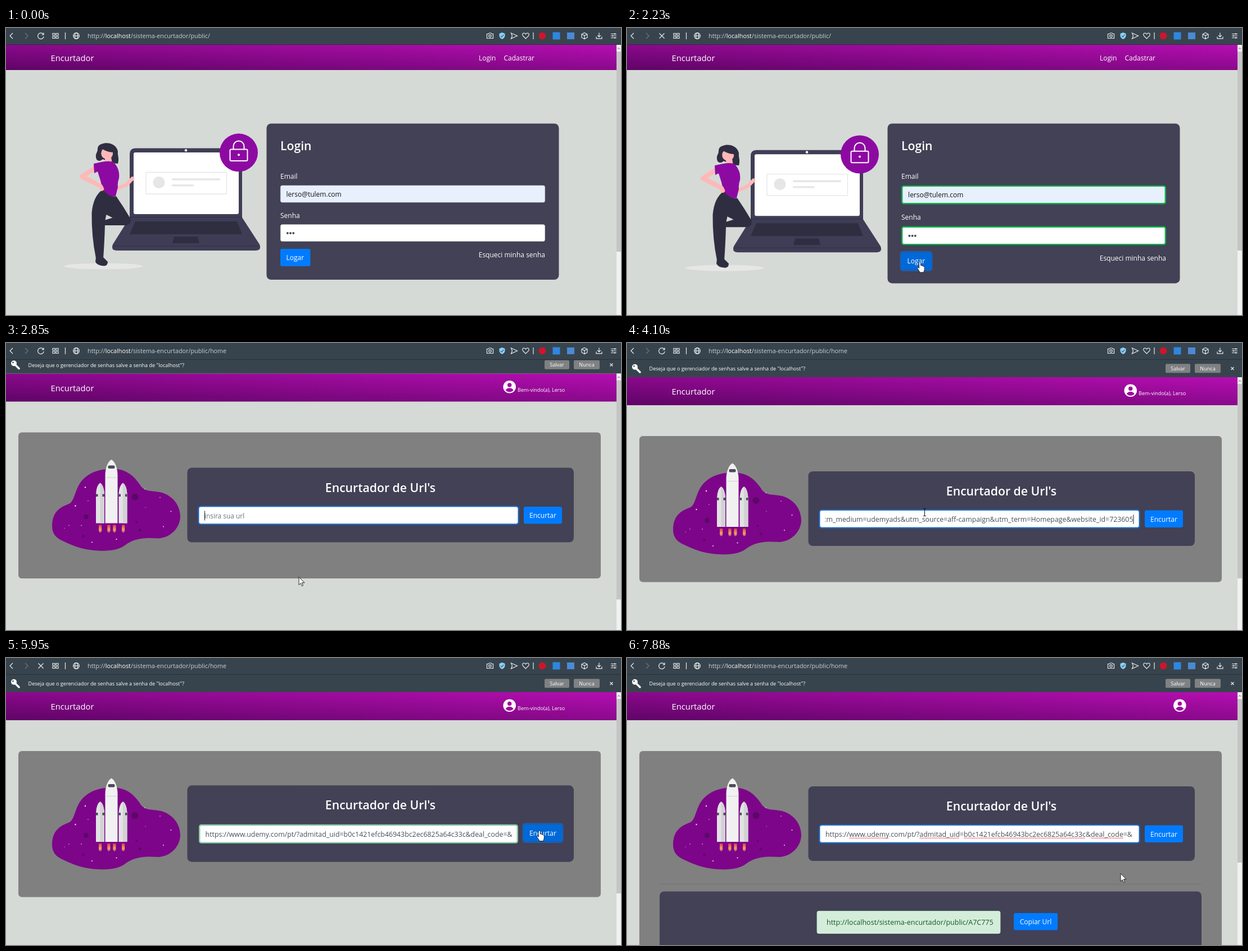
These frames come from a looping animation (1094x512 px, 8 s). An HTML page:

```html
<!DOCTYPE html>
<html lang="pt">
<head>
<meta charset="utf-8">
<title>Encurtador</title>
<style>
html, body { margin: 0; width: 100%; height: 100%; overflow: hidden; background: #d5dad6; }
svg { display: block; width: 1094px; height: 512px; font: 500 12px 'Open Sans', 'Noto Sans', sans-serif; }
text { fill: #fff; white-space: pre; }
.brand { font-size: 14.8px; }
.title { font-size: 21.2px; font-weight: 600; }
.address { font-size: 10.8px; font-weight: 400; fill: #c9cfd4; }
.small { font-size: 9.1px; }
.field { font-size: 12.35px; font-weight: 400; fill: #495057; }
.line { fill: none; stroke: #e8ebed; stroke-width: 1.2; }
.card { fill: #424155; }
.navy { fill: #3f3d56; }
.dark { fill: #2f2e41; }
.skin { fill: #ffb8b8; }
.limb { fill: none; stroke: #ffb8b8; stroke-linecap: round; stroke-linejoin: round; }
.purple { fill: #8d0aa2; }
.pale { fill: #e6e6e6; }
.blue { fill: #007bff; }
.ring { fill: none; stroke: #007bff; }
</style>
</head>
<body>
<svg viewBox="0 0 1094 512">
  <defs>
    <linearGradient id="navFill" x1="0" y1="1" x2="1" y2="0">
      <stop stop-color="#5f0466"/><stop offset="1" stop-color="#b50eb1"/>
    </linearGradient>
    <linearGradient id="flameFill" x1="0" y1="0" x2="0" y2="1">
      <stop stop-color="#d8434e"/><stop offset=".6" stop-color="#f5a05a"/><stop offset="1" stop-color="#f5c08a" stop-opacity=".4"/>
    </linearGradient>
    <clipPath id="fieldClip"><rect x="352.5" y="290" width="549" height="50"/></clipPath>
    <g id="booster">
      <path d="M160 328V276Q161 260 167.500 256Q174 260 175 276V328Z" fill="#e2e2e4"/>
      <path d="M167.500 256Q174 260 175 276V328H167.500Z" fill="#d2d2d5"/>
      <path d="M160 276H163.500V280.500H160ZM171.500 276H175V280.500H171.500Z" fill="#4b4a58"/>
    </g>
    <path id="flame" d="M0 331H5.200V342Q2.600 348 0 342Z" fill="url(#flameFill)"/>
  </defs>

  <rect width="1094" height="512" fill="#d5dad6"/>

  <g id="login">
    <rect y="30" width="1086" height="45" fill="url(#navFill)"/>
    <text class="brand" x="79.500" y="59">Encurtador</text>
    <text x="841" y="57.500">Login</text>
    <text x="885.500" y="57.500">Cadastrar</text>

    <g id="art">
      <ellipse class="pale" cx="173.500" cy="425" rx="70" ry="5.500"/>
      <path class="navy" d="M220 338V225Q220 214.500 230 214.500H410Q420 214.500 420 225V338L451 386Q455 397 444 397H197Q186 397 190 386Z"/>
      <path d="M220 337.500H420M190 389H451" stroke="#2f2e41" stroke-width="1"/>
      <rect x="227" y="222" width="187" height="110" rx="3" fill="#fff"/>
      <circle cx="320" cy="218.300" r="2.200" fill="#fff"/>
      <path class="dark" d="M230 345H411L420 368H220ZM299 372H341L344 384H296Z"/>
      <rect x="249" y="257.500" width="143.500" height="38.500" rx="1" fill="none" stroke="#e6e6e6" stroke-width="1.300"/>
      <circle class="pale" cx="272" cy="275.500" r="10.500"/>
      <rect class="pale" x="295" y="268.300" width="86" height="3.400" rx="1.700"/>
      <rect class="pale" x="295" y="279" width="39" height="3.400" rx="1.700"/>
      <circle class="purple" cx="414" cy="222.300" r="34"/>
      <g fill="none" stroke="#fff" stroke-width="2">
        <rect x="398.500" y="216.500" width="31" height="20.500" rx="2"/>
        <path d="M404.500 216V211A9.500 9.500 0 0 1 423.500 211V216"/>
      </g>
      <circle cx="414" cy="226.300" r="2" fill="#fff"/>

      <path class="limb" stroke-width="6.500" d="M196 287L215 279L225 268.500"/>
      <path class="dark" d="M170 207C180 203 196 206 199 220C198 228 202 232 199 242L189 241L172 234C166 240 160 236 160 230C159 224 163 222 163 216C163 211 166 208 170 207Z"/>
      <path class="skin" d="M176 230L187 230L189 242H176Z"/>
      <circle class="skin" cx="179.700" cy="223.500" r="10.500"/>
      <path class="dark" d="M167 218C170 207 191 206 193 222C184 222 177 219 171 216Z"/>
      <path class="limb" stroke-width="8" d="M158 250L135 265L157 276"/>
      <path class="purple" d="M156 242L170 239Q186 236 192 240Q203 252 201 268Q198 276 199 284L195 300Q184 302 174 297L168 272L163 256L157 259Z"/>
      <path class="dark" d="M172 288Q184 303 196 300Q209 319 222 341Q223 350 214 352L176 352Q175 385 173 411L160 411Q152 372 152.500 330Q155 300 172 288Z"/>
      <path d="M176.500 342.500L189.500 338.500L178.500 333Z" fill="#d5dad6"/>
      <path class="limb" stroke-width="7.500" d="M136 266L168 282L170.500 287"/>
      <path class="dark" d="M160 409H173L181 417Q181 424.500 174 424.500Q162 424 159 417Z"/>
    </g>

    <rect id="loginCard" class="card" x="463.500" y="170.500" width="520" rx="8"/>
    <text class="title" x="488" y="217.500">Login</text>
    <text x="488" y="269">Email</text>
    <rect id="emailBox" x="488" width="471" rx="3" fill="#e8f0fe"/>
    <text id="email" style="fill:#111">lerso@tulem.com</text>
    <g id="senha">
      <text x="488" y="339">Senha</text>
      <rect id="senhaBox" x="488" width="471" rx="3" fill="#fff"/>
      <g id="dots" fill="#495057"><circle cx="500.800" cy="366" r="2"/><circle cx="506" cy="366" r="2"/><circle cx="511.200" cy="366" r="2"/></g>
    </g>
    <g id="loginEnd">
      <rect id="logarRing" class="ring" x="486.700" y="392.700" width="55.600" height="33.600" rx="4.500" stroke-width="2.600"/>
      <rect id="logar" x="488" y="394" width="53.500" height="31" rx="3"/>
      <text x="498.500" y="414">Logar</text>
      <text x="959" y="408.500" text-anchor="end">Esqueci minha senha</text>
    </g>
  </g>

  <g id="home">
    <rect y="61" width="1086" height="50" fill="url(#navFill)"/>
    <text class="brand" x="79.500" y="92.300">Encurtador</text>
    <g id="avatar">
      <circle r="11.300" fill="#fff"/>
      <g fill="#a00d9d"><circle cy="-3.300" r="3.700"/><path d="M-7 5.800Q-4.500 2 0 2T7 5.800Q4.500 9.200 0 9.200T-7 5.800Z"/></g>
    </g>
    <text id="welcome" class="small" x="910" y="93.300">Bem-vindo(a), Lerso</text>
    <rect id="panel" x="22" y="166" width="1036" rx="6" fill="#808080"/>

    <path fill="#7d0589" d="M82 333C82 305 100 298 113 293C124 286 122 262 140 247C156 233 175 231 192 231C214 232 228 243 240 262C249 273 262 270 276 273C297 279 310 296 310 317C309 336 294 353 272 355C252 354 230 353 212 367C202 375 186 378 165 377C143 376 124 371 104 361C90 355 82 348 82 333Z"/>
    <g id="craters" fill="#5c0869"></g>
    <g id="stars" fill="#f4e4f6"></g>
    <use href="#booster"/><use href="#booster" x="40.500"/>
    <path fill="#f1f1f2" d="M176.500 328V242C176.500 230 181 218 187.500 214.500C194 218 198.500 230 198.500 242V328Z"/>
    <path d="M176.500 246.500H198.500" stroke="#d0d0d3" stroke-width="1"/>
    <rect x="181.500" y="225" width="12" height="5.500" rx="2" fill="#4b4a58"/>
    <use href="#flame" x="165"/><use href="#flame" x="180.300"/><use href="#flame" x="190.300"/><use href="#flame" x="206"/>

    <rect id="homeCard" class="card" x="322.500" width="687.500" rx="8"/>
    <g id="form">
      <text class="title" x="666" y="272" text-anchor="middle">Encurtador de Url's</text>
      <rect id="urlRing" class="ring" x="342.200" y="297.700" width="569.600" height="32.200" rx="4" stroke-width="2.600"/>
      <rect id="urlBox" x="343" y="298.500" width="568" rx="3" fill="#fff"/>
      <rect id="encurtarRing" class="ring" x="919.700" y="297.200" width="70.600" height="33.200" rx="4.500" stroke-width="2.600"/>
      <rect id="encurtar" x="921" y="298.500" width="68" height="30.600" rx="3"/>
      <text x="955" y="318.800" text-anchor="middle">Encurtar</text>
    </g>
    <g clip-path="url(#fieldClip)">
      <text id="hint" class="field" x="353" y="319" style="font-size:11.9px;fill:#6c757d">insira sua url</text>
      <text id="head" class="field" y="319">https://www.udemy.com/pt/?admitad_uid=b0c1421efcb46943bc2ec6825a64c33c&amp;deal_code=&amp;</text>
      <text id="tail" class="field" x="900.500" y="319" text-anchor="end">&amp;utm_medium=udemyads&amp;utm_source=aff-campaign&amp;utm_term=Homepage&amp;website_id=723605</text>
      <g id="spell" fill="none" stroke="#e0342c" stroke-width=".8"><path id="headWave"/><path id="tailWave"/></g>
    </g>
    <rect id="caret" y="306" width="1" height="17" fill="#222"/>

    <g id="result">
      <path d="M58 403.500H1022" stroke="#737373"/>
      <rect class="card" x="58" y="416.500" width="964" height="140" rx="8"/>
      <rect x="338" y="451.500" width="326" height="40" rx="3" fill="#d4edda" stroke="#c3e6cb" stroke-width=".8"/>
      <text x="355" y="476" style="font-size:12.5px;font-weight:400;fill:#155724">http://localhost/sistema-encurtador/public/A7C775</text>
      <rect class="blue" x="688" y="455" width="78" height="30.600" rx="3"/>
      <text x="727" y="475" text-anchor="middle">Copiar Url</text>
    </g>
  </g>

  <g id="bar">
    <rect y="20" width="1094" height="41" fill="#38444d"/>
    <circle cx="14" cy="42.800" r="5" fill="#fff"/><circle cx="12.500" cy="41.300" r="1.300" fill="#38444d"/>
    <path d="M16.500 45.500L23 52" stroke="#fff" stroke-width="3.600" stroke-linecap="round"/>
    <text class="small" x="39.500" y="49.300">Deseja que o gerenciador de senhas salve a senha de "localhost"?</text>
    <rect x="958" y="37.300" width="44" height="16" rx="2" fill="#7f8183"/>
    <rect x="1010" y="37.300" width="46" height="16" rx="2" fill="#7f8183"/>
    <text class="small" x="980" y="48.700" text-anchor="middle">Salvar</text>
    <text class="small" x="1033" y="48.700" text-anchor="middle">Nunca</text>
    <path class="line" d="M1074.500 43L1079.500 48M1079.500 43L1074.500 48"/>
  </g>

  <g>
    <rect width="1094" height="29" fill="#38444d"/>
    <rect y="29" width="1094" height="1" fill="#273138"/>
    <g class="line">
      <path d="M12 9L7 14L12 19"/>
      <path d="M34 9L39 14L34 19" opacity=".3"/>
      <path id="reload" d="M66.500 11.500A5.300 5.300 0 1 0 67.200 15M67 8.500V12H63.500"/>
      <path id="stop" d="M57.500 9.500L66.500 18.500M66.500 9.500L57.500 18.500"/>
      <path d="M83 9.500H87V13H83ZM89 9.500H93V13H89ZM83 15H87V18.500H83ZM89 15H93V18.500H89Z"/>
      <path d="M105.500 8V20M938 8V20"/>
      <circle cx="125" cy="14" r="5.300"/><ellipse cx="125" cy="14" rx="2.400" ry="5.300"/><path d="M120 14H130"/>
      <path d="M855.500 10.500H858.500L859.500 9H863L864 10.500H866.500V18.500H855.500Z"/><circle cx="861" cy="14.300" r="2.200"/>
      <path d="M898.500 9L909.500 14L898.500 19L900.500 14Z"/>
      <path d="M924.500 19L919.500 14Q917.500 10 921 9Q923.500 9 924.500 11Q925.500 9 928 9Q931.500 10 929.500 14Z"/>
      <path d="M1029 8.500L1034 11V17L1029 19.500L1024 17V11ZM1024 11L1029 13.500L1034 11M1029 13.500V19.500"/>
      <path d="M1055 8.500V15.500M1052 12.800L1055 15.800L1058 12.800M1050 15.500V18.800H1060V15.500"/>
      <path d="M1076 10.500H1086M1076 14H1086M1076 17.500H1086M1083 9V12M1079 12.500V15.500M1083 16V19"/>
    </g>
    <path d="M882.500 8L887.500 10V14.500Q886.500 18 882.500 20Q878.500 18 877.500 14.500V10Z" fill="#8ed0f5"/>
    <path d="M880 14L882 16L885.300 12" fill="none" stroke="#2c6f9c" stroke-width="1.300"/>
    <circle cx="954" cy="14" r="6.300" fill="#d0142c"/>
    <rect x="972.500" y="7.500" width="13" height="13" fill="#2f86e0"/>
    <rect x="998" y="8" width="13" height="12" fill="#4a8ad4"/>
    <text class="address" x="145" y="18">http://<tspan fill="#fff" font-weight="500">localhost</tspan>/sistema-encurtador/public/<tspan id="route"></tspan></text>
  </g>

  <g>
    <rect id="track" x="1086" width="8" height="512" fill="#f1f1f1"/>
    <path id="up" d="M1087.800 2L1090 -.5L1092.200 2" fill="none" stroke="#666"/>
    <rect id="thumb" x="1086" width="8" fill="#c5c5c5"/>
  </g>

  <g id="pointer">
    <path id="arrow" d="M0 0V14L3.300 11L5.500 16L7.600 15L5.400 10.200H10Z" fill="#fff" stroke="#111" stroke-width=".9"/>
    <path id="hand" d="M-1.500 1.500C-1.500 -.5 1.500 -.5 1.500 1.500V6.200C2.500 5.600 4 5.800 4.200 7C5.200 6.500 6.300 6.900 6.500 8C7.600 7.700 8.300 8.500 8.300 9.600V13C8.300 15 7 16 7 18.500H-.3C-.5 16 -4.200 13 -4.400 10.600C-4.200 9 -2.600 9.400 -1.500 11Z" fill="#fff" stroke="#111" stroke-width=".9"/>
    <path id="beam" d="M-2.500 -6.500H2.500M0 -6.500V6.500M-2.500 6.500H2.500" fill="none" stroke="#111" stroke-width="1"/>
  </g>
</svg>
<script>
const LOOP = 8000, TICK = 70;
const $ = id => document.getElementById(id);
const set = (id, attrs) => { for (const k in attrs) $(id).setAttribute(k, attrs[k]); };
const show = (id, on) => { $(id).style.display = on ? '' : 'none'; };
const move = (id, x, y) => set(id, { transform: `translate(${x} ${y})` });
const clamp = v => Math.max(0, Math.min(1, v));
const mix = (a, b, p) => `rgb(${a.map((v, i) => Math.round(v + (b[i] - v) * p))})`;
const within = (t, a, b) => t >= a && t < b;
// Value of the last row whose time has come.
const step = (rows, t) => rows.reduce((v, [time, next]) => t >= time ? next : v, 0);

const BLUE = [0, 123, 255], HOVER = [0, 105, 217];
const GREY = [206, 212, 218], FOCUS = [128, 189, 255], GREEN = [14, 176, 74];

const slide = [[2680, 7], [2760, 16], [2850, 24.5], [2920, 29], [2990, 31]];
const loginValid = [[2140, .5], [2230, 1]];
const homeValid = [[5950, .35], [6030, .8], [6110, 1]];
const loginHover = [[1540, .4], [1610, .8], [1680, 1]];
const homeHover = [[5410, .5], [5490, 1]];
const loginRing = [[1910, .25], [1980, .5]];
const homeRing = [[5720, .3], [5790, .5], [7280, 0]];

// start, end, then start point, bend and end point
const moves = [
  [450, 450, 803, 461, 803, 461, 803, 461],
  [510, 510, 625, 467, 625, 467, 625, 467],
  [990, 1680, 625, 467, 560, 450, 521, 417.5],
  [3050, 3310, 521, 417.5, 522, 350, 529.5, 302],
  [4570, 5340, 529.5, 302, 740, 199, 949, 308],
  [6720, 6950, 949, 308, 905, 340, 873, 388],
  [7350, 7350, 878, 384.5, 878, 384.5, 878, 384.5]
];

function pointerAt(t) {
  const m = moves.filter(row => t >= row[0]).pop();
  if (!m) return null;
  const [a, b, x0, y0, cx, cy, x1, y1] = m;
  const u = clamp((Math.floor((t - a) / TICK) + 1) * TICK / (b - a + TICK));
  const p = u * u * (3 - 2 * u), q = 1 - p;
  const bend = (v0, c, v1) => q * q * v0 + 2 * q * p * c + p * p * v1;
  return [bend(x0, cx, x1), bend(y0, cy, y1)];
}

function pointerKind(t, [x, y]) {
  const over = (l, top, r, b) => x >= l && x <= r && y >= top && y <= b;
  if (t < 2450) return over(488, 394, 541, 425) ? 'hand' : 'arrow';
  if (t < 2760) return 'hand';
  if (over(921, 298, 989, 329)) return 'hand';
  return over(343, 298, 911, 330) ? 'beam' : 'arrow';
}

function drawPointer(t) {
  const at = pointerAt(t);
  show('pointer', at);
  if (!at) return;
  move('pointer', ...at);
  const kind = pointerKind(t, at);
  for (const id of ['arrow', 'hand', 'beam']) show(id, id === kind);
}

function drawLogin(t) {
  const p = step(loginValid, t), grow = p ? 3.2 : 0;
  const border = { stroke: mix(GREY, GREEN, p), 'stroke-width': p ? 2.4 : .8 };
  const inset = p ? 1.2 : .4;
  const box = y => ({ ...border, x: 488 + inset, y: y + inset, width: 471 - 2 * inset, height: 30.6 + grow - 2 * inset });
  move('art', 0, grow);
  set('loginCard', { height: 278.5 + 2 * grow });
  set('emailBox', box(280.7));
  set('email', { x: 498.5 + grow / 2, y: 300.8 + grow / 2 });
  move('senha', 0, grow);
  set('senhaBox', box(350.3));
  move('dots', grow / 2, grow / 2);
  move('loginEnd', 0, 2 * grow);
  set('logar', { fill: mix(BLUE, HOVER, step(loginHover, t)) });
  set('logarRing', { opacity: step(loginRing, t) });
}

function caretOn(t) {
  if (t < 4100) return !within(t, 3260, 3790);
  if (t < 5720) return Math.floor((t - 4100) / 530) % 2 === 0;
  return within(t, 7280, 7880);
}

function drawHome(t, off) {
  const done = t >= 7280;
  const p = done ? 0 : step(homeValid, t), lift = p ? 1.7 : 0;
  const focused = t < 5720 || done, pasted = within(t, 4100, 5720);
  const inset = p ? 1.2 : .4;
  move('home', 0, off - 31);
  move('avatar', done ? 983.3 : 895.7, 84.7);
  show('welcome', !done);
  show('result', done);
  set('panel', { height: done ? 400 : 260.5 });
  set('homeCard', { y: 229 - lift, height: 133 + 2 * lift });
  move('form', 0, -lift);
  set('urlBox', {
    x: 343 + inset, y: 298.5 + inset, width: 568 - 2 * inset, height: 30.6 + 2 * lift - 2 * inset,
    stroke: mix(focused ? FOCUS : GREY, GREEN, p), 'stroke-width': 2 * inset
  });
  set('urlRing', { opacity: focused ? .5 : within(t, 5720, 5790) ? .25 : 0 });
  set('encurtar', { fill: mix(BLUE, HOVER, done ? 0 : step(homeHover, t)) });
  set('encurtarRing', { opacity: step(homeRing, t) });
  show('hint', t < 4100);
  show('tail', pasted);
  show('head', t >= 5720);
  set('head', { x: p ? 354.6 : 353 });
  show('tailWave', within(t, 4170, 5720));
  show('headWave', t >= 7430);
  set('caret', { x: pasted ? 900.5 : 353 });
  show('caret', caretOn(t));
}

function drawScroll(t, off) {
  const top = 30 + off;
  let bottom = t < 2140 ? 399 : 397;
  if (t >= 2450) bottom = t < 2990 ? 433 + off : 420;
  if (t >= 7280) bottom = 365;
  set('track', { y: top });
  move('up', 0, top + 6);
  set('thumb', { y: top + 12, height: bottom - top - 12 });
}

function draw(t) {
  const off = step(slide, t), atHome = t >= 2450;
  const loading = within(t, 1910, 2760) || within(t, 5720, 7350);
  show('login', !atHome);
  show('home', atHome);
  show('bar', off);
  move('bar', 0, off - 31);
  show('stop', loading);
  show('reload', !loading);
  $('route').textContent = t >= 2300 ? 'home' : '';
  if (atHome) drawHome(t, off); else drawLogin(t);
  drawScroll(t, off);
  drawPointer(t);
}

// Zigzag under each word the spell checker does not know.
function wave(id, from) {
  const el = $(from);
  let d = '';
  for (const m of el.textContent.matchAll(/www\.udemy|[a-z]+_[a-z]+|b0c\w+|udemyads/g)) {
    const a = el.getStartPositionOfChar(m.index).x;
    const b = el.getEndPositionOfChar(m.index + m[0].length - 1).x;
    for (let x = a, i = 0; x < b; x += 1.6, i++) d += `${i ? 'L' : 'M'}${x.toFixed(1)} ${i % 2 ? 320.6 : 322}`;
  }
  set(id, { d });
}

function dots(id, list) {
  $(id).innerHTML = list.map(([x, y, r]) => `<circle cx="${x}" cy="${y}" r="${r}"/>`).join('');
}
dots('craters', [[229.5, 281, 6], [142.5, 316.5, 4.5], [137.5, 351, 2.3], [232.5, 326, 2], [238, 340.5, 2.5]]);
dots('stars', [[123.5, 297, 1.2], [141, 264, 1.2], [247, 267, .8], [274, 282, .8], [293.5, 307, .9], [280, 334, .9],
  [153, 362, 1], [196.5, 356.5, 1.1], [112, 332, .7], [134, 332, .8], [146, 288, .7], [104, 337, .6], [248, 300, .6]]);

set('head', { x: 353 });
wave('headWave', 'head');
wave('tailWave', 'tail');

const start = performance.now();
function frame() {
  draw((performance.now() - start) % LOOP);
  requestAnimationFrame(frame);
}
frame();
</script>
</body>
</html>
```
